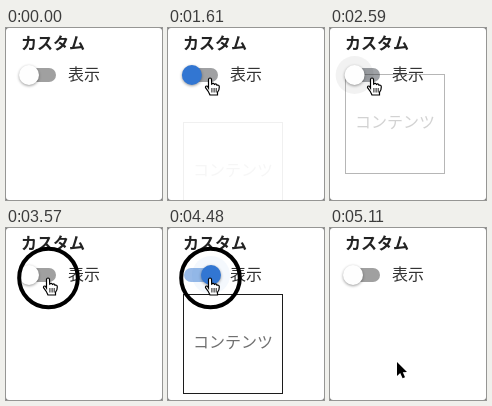
Animation, 156 px wide and 172 px high, one loop 5180 ms. Source, as an HTML page with a canvas:

```html
<!DOCTYPE html>
<html lang="ja">
<head>
<meta charset="utf-8">
<title>スイッチ</title>
<style>
html, body { margin: 0; width: 100%; height: 100%; overflow: hidden; background: #fff; }
canvas { display: block; }
</style>
</head>
<body>
<canvas id="stage" width="156" height="172"></canvas>
<script>
const ctx = document.getElementById('stage').getContext('2d');
const LOOP = 5180, STEP = 70, SLIDE = 250;
const FONT = '16px "Noto Sans CJK JP", "Noto Sans CJK", sans-serif';
const GRAY = [160, 160, 160], BLUE = [50, 118, 210], PALE = [152, 186, 232];

// Press shows the ring, click flips the switch
const toggles = [
  { press: 1470, click: 1591, on: true },
  { press: 2380, click: 2490, on: false },
  { press: 3570, click: 3687, on: true },
  { press: 4480, click: 4644, on: false }
];

// Pointer path: time, x, y
const path = [
  [70, 72, 158], [140, 78, 122], [210, 73, 78], [280, 62, 44], [350, 50, 24],
  [420, 40, 28], [490, 38, 43], [560, 43, 51], [630, 42, 49],
  [4900, 42, 49], [4970, 48, 72], [5040, 62, 118], [5110, 67, 134]
];

const clamp = v => Math.max(0, Math.min(1, v));
const lerp = (a, b, p) => a + (b - a) * p;
const rgba = (c, a = 1) => `rgba(${c.map(Math.round)},${a})`;

function bezier(x1, y1, x2, y2) {
  const at = (a, b, s) => 3 * a * s * (1 - s) ** 2 + 3 * b * s * s * (1 - s) + s ** 3;
  return x => {
    x = clamp(x);
    let lo = 0, hi = 1;
    for (let i = 0; i < 24; i++) {
      const mid = (lo + hi) / 2;
      if (at(x1, x2, mid) < x) lo = mid; else hi = mid;
    }
    return at(y1, y2, (lo + hi) / 2);
  };
}
const ease = bezier(0.25, 0.1, 0.25, 1);
const easeInOut = bezier(0.4, 0, 0.2, 1);

function circle(x, y, r, fill) {
  ctx.beginPath();
  ctx.arc(x, y, r, 0, Math.PI * 2);
  ctx.fillStyle = fill;
  ctx.fill();
}

function pill(x, y, w, h, r, fill) {
  ctx.beginPath();
  ctx.roundRect(x, y, w, h, r);
  ctx.fillStyle = fill;
  ctx.fill();
}

function text(str, x, y, color, weight = 400) {
  ctx.font = `${weight} ${FONT}`;
  ctx.fillStyle = color;
  ctx.fillText(str, x, y);
}

function drawBox(state, age) {
  const p = ease(age / SLIDE);
  const alpha = state.on ? p : 1 - p;
  if (alpha < 0.01) return;
  const y = 66 + (state.on ? 30 * (1 - p) : -30 * p);
  ctx.save();
  ctx.globalAlpha = alpha;
  ctx.strokeStyle = '#1c1c1c';
  ctx.lineWidth = 1;
  ctx.strokeRect(15.5, Math.round(y) + 0.5, 99, 99);
  text('コンテンツ', 25, y + 54, '#707070');
  ctx.restore();
}

function drawRipple(x, t) {
  const tap = toggles.find(g => g.on && t >= g.press && t < g.click + 260);
  if (!tap) return;
  const grow = easeInOut((t - tap.press) / 550);
  const fade = 1 - clamp((t - tap.click) / 260) ** 3;
  circle(x, 47, 19 * grow, rgba(BLUE, (0.1 + 0.2 * grow) * fade));
}

function drawThumb(x, on, t) {
  if (x > 24) circle(x, 47, 19, rgba(on ? BLUE : [0, 0, 0], 0.05));
  drawRipple(x, t);
  ctx.save();
  ctx.shadowColor = 'rgba(0,0,0,0.4)';
  ctx.shadowBlur = 3;
  ctx.shadowOffsetY = 1;
  circle(x, 47, 10, on ? rgba(BLUE) : '#fefefe');
  ctx.restore();
}

function drawRing(t) {
  const ring = (r, w) => {
    ctx.beginPath();
    ctx.arc(42.5, 50, r, 0, Math.PI * 2);
    ctx.lineWidth = w;
    ctx.strokeStyle = '#000';
    ctx.stroke();
  };
  if (t >= 770 && t < 910) ring(20.3, 3);
  if (toggles.some(g => t >= g.press && t < g.press + 140)) ring(29.3, 4);
}

function drawArrow() {
  const pts = [[0, 0], [0, 14], [3.2, 11], [5.6, 16.3], [8, 15.2], [5.8, 10.2], [10, 10]];
  ctx.beginPath();
  pts.forEach(([x, y]) => ctx.lineTo(x, y));
  ctx.closePath();
  ctx.lineWidth = 2;
  ctx.strokeStyle = '#fff';
  ctx.stroke();
  ctx.fillStyle = '#000';
  ctx.fill();
}

function drawHand() {
  ctx.beginPath();
  ctx.moveTo(-1.5, 11);
  ctx.lineTo(-1.5, 2.5);
  ctx.quadraticCurveTo(-1.3, 1, 0, 1);
  ctx.quadraticCurveTo(1.4, 1, 1.5, 2.5);
  ctx.lineTo(1.7, 7);
  ctx.quadraticCurveTo(3.6, 5.4, 4.5, 7.4);
  ctx.quadraticCurveTo(6.4, 6.2, 7, 8.3);
  ctx.quadraticCurveTo(9.3, 7.6, 9.3, 10);
  ctx.quadraticCurveTo(9.3, 13.5, 7.5, 15.2);
  ctx.lineTo(7.5, 18);
  ctx.lineTo(0, 18);
  ctx.quadraticCurveTo(-1, 15, -4.5, 10.7);
  ctx.quadraticCurveTo(-4.6, 8.4, -2.6, 9.2);
  ctx.closePath();
  ctx.fillStyle = '#fff';
  ctx.fill();
  ctx.lineWidth = 1.2;
  ctx.strokeStyle = '#000';
  ctx.stroke();
  ctx.beginPath();
  for (const x of [1.9, 4.1, 6.2]) {
    ctx.moveTo(x, 11);
    ctx.lineTo(x, 15.5);
  }
  ctx.lineWidth = 0.9;
  ctx.stroke();
}

function drawPointer(t) {
  if (t < path[0][0]) return;
  let i = path.length - 1;
  while (path[i][0] > t) i--;
  const a = path[i], b = path[i + 1] || a;
  const p = b === a ? 0 : (t - a[0]) / (b[0] - a[0]);
  ctx.save();
  ctx.translate(lerp(a[1], b[1], p), lerp(a[2], b[2], p));
  if (t >= 1260 && t < 4970) drawHand(); else drawArrow();
  ctx.restore();
}

function draw(t) {
  const state = toggles.findLast(g => g.click <= t) || { on: false, click: -LOOP };
  const age = t - state.click;
  const move = easeInOut(age / 150);
  const p = state.on ? move : 1 - move;

  ctx.fillStyle = '#777';
  ctx.fillRect(0, 0, 156, 172);
  pill(0, 0, 156, 172, 3, '#fff');
  text('カスタム', 15, 21, '#222', 700);
  pill(16, 40, 34, 14, 7, rgba(GRAY.map((c, i) => lerp(c, PALE[i], p))));
  text('表示', 62, 52, '#333');
  drawBox(state, age);
  drawThumb(23 + 20 * p, state.on, t);
  drawRing(t);
  drawPointer(t);
}

const start = performance.now();
function frame() {
  const t = (performance.now() - start) % LOOP;
  draw(Math.floor(t / STEP) * STEP);
  requestAnimationFrame(frame);
}
frame();
</script>
</body>
</html>
```
